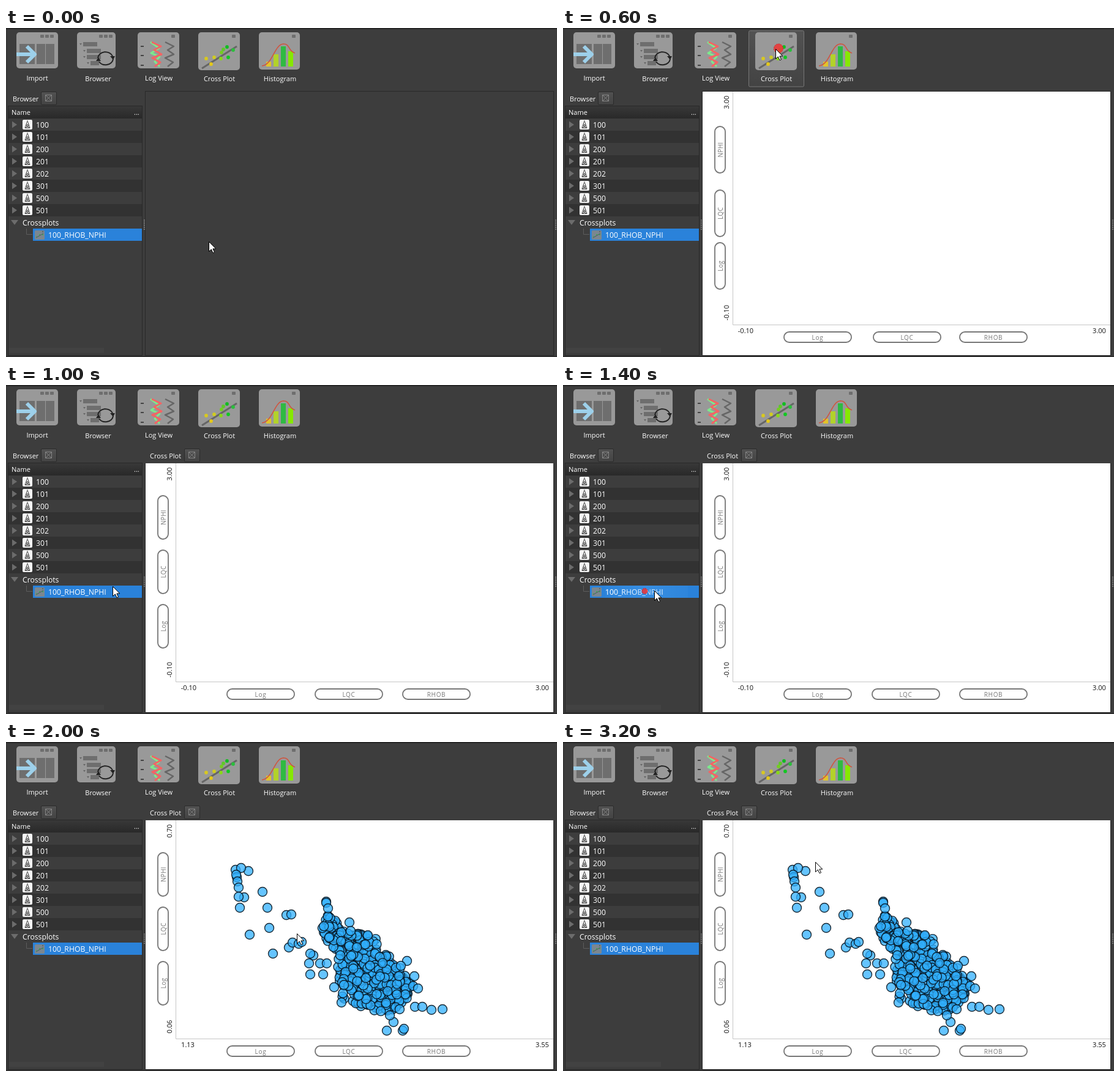
An HTML page for the animation above (3800 ms loop, 900 by 538 pixels).

```html
<!DOCTYPE html>
<html lang="en">
<head>
<meta charset="utf-8">
<title>Cross plot demo</title>
<style>
html, body { margin: 0; width: 100%; height: 100%; overflow: hidden; background: #3d3d3d; }
svg { display: block; width: 900px; height: 538px; }
text { font: 11px "Open Sans", "Noto Sans", sans-serif; fill: #fff; }
.row { font-size: 12.2px; }
.mid { text-anchor: middle; }
.axis { fill: #111; text-anchor: middle; }
.pill { font-size: 10px; fill: #777; text-anchor: middle; }
.line { fill: none; stroke-linejoin: round; }
</style>
</head>
<body>
<svg id="stage" viewBox="0 0 900 538"></svg>
<script>
const LOOP = 3800;

const rect = (x, y, w, h, fill, more = '') =>
  `<rect x="${x}" y="${y}" width="${w}" height="${h}" fill="${fill}" ${more}/>`;
const path = (d, stroke, width = 1, more = '') =>
  `<path class="line" d="${d}" stroke="${stroke}" stroke-width="${width}" ${more}/>`;
const shape = (d, fill) => `<path d="${d}" fill="${fill}"/>`;
const dot = (x, y, r, fill) => `<circle cx="${x}" cy="${y}" r="${r}" fill="${fill}"/>`;
const text = (x, y, s, cls = '', more = '') => `<text x="${x}" y="${y}" class="${cls}" ${more}>${s}</text>`;
const group = (id, body) => `<g id="${id}">${body}</g>`;
const upright = (x, y, s, cls, more = '') =>
  text(0, 0, s, cls, `transform="translate(${x} ${y}) rotate(-90)" ${more}`);

const DEFS = `<defs>
  <linearGradient id="head" x2="0" y2="1"><stop stop-color="#383838"/><stop offset="1" stop-color="#292929"/></linearGradient>
  <linearGradient id="btn" x2="0" y2="1"><stop stop-color="#525252"/><stop offset="1" stop-color="#434343"/></linearGradient>
  <linearGradient id="fade"><stop stop-color="#3c92e4" stop-opacity=".15"/><stop offset=".5" stop-color="#3c92e4" stop-opacity=".75"/><stop offset="1" stop-color="#3c92e4" stop-opacity=".2"/></linearGradient>
</defs>`;

// Toolbar
const tile = (x, y, w, h, squares) =>
  rect(x, y, w, h, '#999', 'rx="5"') +
  squares.map(s => rect(s, y + 4, 6, 5, '#6e6e6e', 'rx="1"')).join('');

function importIcon() {
  return tile(17, 7, 68, 59, [56, 64, 72]) +
    [22, 50, 65].map((x, i) => rect(x, 26, i ? 14 : 25, 33, '#6e6e6e')).join('') +
    path('M17 43H46M34 30L47 43L34 56', '#9dd0ea', 6);
}

function browserIcon() {
  const bars = [[126, 23], [132, 34], [132, 44], [138, 54]];
  return tile(116, 7, 63, 59, [152, 160, 168]) +
    bars.map(([x, y], i) => rect(x, y, i === 3 ? 14 : 23, 7, '#6e6e6e') +
      shape(`M${x - 6} ${y + 2}h4l-2 3z`, '#666')).join('') +
    path('M150 49A12.5 11 0 0 1 174 46M175 51A12.5 11 0 0 1 152 55', '#222', 2) +
    shape('M170 46h8l-3 6zM147 54h8l-4 -6z', '#222');
}

function logIcon() {
  const zig = 'l15 7l-11 6l12 7l-15 6l13 7l-9 7';
  return tile(215, 7, 68, 59, [270]) +
    [29, 44, 60].map(y => rect(220, y, 5, 2, '#444')).join('') +
    path('M236 23l14 10l-13 8l14 6l-8 8l8 8', '#7cea8c', 3) +
    path('M238 23' + zig, '#f46464', 3) +
    path('M260 23l14 7l-10 6l10 7l-14 6l13 7l-9 7', '#666', 2.5);
}

function crossIcon() {
  const dots = [[327, 50, '#d8c820'], [340, 48, '#d0cc20'], [335, 59, '#e4c81a'], [351, 50, '#88d818'],
    [352, 40, '#74cc22'], [355, 35, '#5fc828'], [361, 31, '#12bd22'], [371, 36, '#2abf3c'], [363, 48, '#12c822']];
  return tile(314, 7, 68, 62, [369]) + path('M320 66L377 30', '#666', 3) +
    dots.map(([x, y, c]) => dot(x, y, 2.9, c)).join('');
}

function histIcon() {
  const bars = [[425, 55, '#e2c32a'], [437, 43, '#b2d22a'], [449, 30, '#2fba42'], [461, 38, '#86e800']];
  return tile(413, 7, 67, 61, [467]) +
    bars.map(([x, y, c]) => rect(x, y, 8, 63 - y, c)).join('') +
    path('M418 62C436 60 438 27 453 26C465 26 460 38 472 41', '#d05540', 1.6);
}

const hover = rect(303.5, 4.5, 90, 91.5, 'url(#btn)', 'stroke="#777" rx="2"');
const toolbar = importIcon() + browserIcon() + logIcon() + crossIcon() + histIcon() +
  [[51, 86, 'Import'], [150.5, 87, 'Browser'], [249.5, 86, 'Log View'], [348.5, 87, 'Cross Plot'], [447.5, 87, 'Histogram']]
    .map(([x, y, s]) => text(x, y, s, 'mid')).join('');

// Side panel
const tab = (x, name, bx) => text(x, 120, name) +
  rect(bx + .5, 104.5, 25, 21, 'url(#btn)', 'stroke="#2b2b2b" rx="1.5"') +
  path(`M${bx + 7.5} 109.5h10v10h-10zl10 10m0 -10l-10 10`, '#858585', 1);

function wellRow(name, i) {
  const y = 148 + 20 * i;
  return (i % 2 ? rect(4, y, 218, 20, '#323232') : '') +
    shape(`M10 ${y + 4.5}v11l8 -5.5z`, '#6c6c6c') +
    rect(27, y + 2, 16, 16, '#f6f6f6', 'rx="2"') +
    path(`M34 ${y + 4}h2M34.5 ${y + 5}L31 ${y + 15.5}h8L35.5 ${y + 5}M33 ${y + 9}l4 3l-5 3M37 ${y + 9}l-4 3l5 3`, '#333', .9) +
    text(49, y + 15, name, 'row');
}

const plotRow = rect(44, 328, 178, 20, '#2a82da') +
  rect(47, 331, 16, 15, '#7b8790', 'rx="1.5"') + rect(59, 332, 2, 2, '#5d666d') +
  path('M49 343L61 336', '#4d5a5e', 1) +
  dot(50, 341, 1, '#4ba45c') + dot(55, 338, 1, '#34ad4d') + dot(60, 338, 1, '#2caf50') +
  text(69, 343, '100_RHOB_NPHI', 'row');

const grip = x => [...Array(6)].map((_, i) => rect(x, 313.5 + 3 * i, 2, 1.5, '#888')).join('');

const panel = rect(3.5, 127.5, 219, 408, '#3d3d3d', 'stroke="#292929"') +
  tab(11, 'Browser', 57) +
  rect(4, 128, 218, 20, 'url(#head)') + text(9, 142, 'Name') + text(209, 142, '...') +
  ['100', '101', '200', '201', '202', '301', '500', '501'].map(wellRow).join('') +
  shape('M8 314h12l-6 8z', '#6c6c6c') + text(27, 323, 'Crossplots', 'row') +
  path('M33.5 328V337.5H43', '#5c5c5c') + plotRow +
  rect(5, 523, 155, 8, '#424242') + grip(225) + grip(897);

// Plot area
const pillH = (x, s) => rect(x + 1, 497, 110, 17, '#fff', 'rx="8.5" stroke="#777" stroke-width="1.8"') +
  text(x + 56, 510, s, 'pill', 'letter-spacing=".7"');
const pillV = (y, h, s) => rect(248, y + 1, 17, h - 2, '#fff', 'rx="8.5" stroke="#777" stroke-width="1.8"') +
  upright(260.5, y + h / 2, s, 'pill', 'letter-spacing=".3"');

const sheet = (top, h, ys, midX) => rect(228, top, 666, 535 - top, '#fff') +
  path(`M277.5 ${top}V485.5H894`, '#c6c6c6') +
  ['NPHI', 'LQC', 'Log'].map((s, i) => pillV(ys[i], h, s)).join('') +
  pillH(360, 'Log') + pillH(midX, 'LQC') + pillH(647, 'RHOB');

const scale = (topY, y1, y0, x0, x1, mx = 298.5) => upright(271, topY, y1, 'axis') +
  upright(271, 465.5, y0, 'axis') + text(mx, 499, x0, 'axis') + text(876, 499, x1, 'axis');

// Cloud outline: height, left, right
const BANDS = [[284, 518, 534], [305, 516, 545], [320, 521, 604], [340, 536, 617], [360, 543, 634],
  [380, 539, 653], [400, 546, 666], [420, 549, 654], [442, 604, 634]];
const STRAYS = [375, 209, 396, 211, 384, 206, 377, 221, 376, 217, 378, 228, 380, 238, 389, 254, 380, 253, 382, 271,
  419, 245, 427, 271, 430, 304, 398, 315, 436, 346, 458, 283, 466, 282, 462, 336, 468, 328, 478, 330, 483, 327,
  502, 349, 497, 346, 495, 362, 497, 380, 513, 362, 518, 380, 524, 362, 523, 261, 523, 263, 526, 272, 536, 401,
  561, 295, 563, 309, 655, 358, 645, 366, 667, 383, 665, 399, 673, 403, 668, 433, 680, 433, 695, 438, 713, 437,
  622, 472, 633, 458, 648, 472, 650, 469, 627, 447, 643, 437, 548, 426, 591, 316];

function cloud() {
  let seed = 7, out = '';
  const rnd = () => (seed = seed * 16807 % 2147483647) / 2147483647;
  const mark = (x, y) => { out += `<circle cx="${x.toFixed(1)}" cy="${y.toFixed(1)}" r="7.5"/>`; };
  for (let n = 0; n < 430;) {
    const x = 514 + rnd() * 154, y = 284 + rnd() * 158;
    const i = BANDS.findIndex(b => b[0] > y), [a, b] = [BANDS[i - 1], BANDS[i]];
    if (!a || !b) continue;
    const k = (y - a[0]) / (b[0] - a[0]);
    if (x < a[1] + k * (b[1] - a[1]) || x > a[2] + k * (b[2] - a[2])) continue;
    mark(x, y);
    n++;
  }
  for (let i = 0; i < STRAYS.length; i += 2) mark(STRAYS[i], STRAYS[i + 1]);
  return `<g fill="#32b0ff" fill-opacity=".75" stroke="#06121c" stroke-opacity=".88" stroke-width="1.4">${out}</g>`;
}

const plotTab = tab(235, 'Cross Plot', 291);
const docked = rect(227, 103, 668, 25, '#3d3d3d') + plotTab + sheet(128, 73, [180, 269, 358], 504);

const arrow = '<path d="M.5 .5V16.5L4.3 12.9L7 18.7L9.5 17.6L6.9 12H11.8Z" fill="#fff" stroke="#000" stroke-width="1"/>';
const resize = '<path d="M4.5 .7L8.5 5.5H5.5V17.5H8.5L4.5 22.3L.5 17.5H3.5V5.5H.5Z" fill="#fff" stroke="#000" stroke-width="1"/>';

const stage = document.getElementById('stage');
stage.innerHTML = DEFS + rect(0, 0, 900, 538, '#3d3d3d') + rect(0, 0, 900, 2, '#262626') +
  rect(0, 2, 3, 536, '#393939') + rect(0, 536, 900, 2, '#303030') +
  group('hover', hover) + toolbar + panel +
  rect(227.5, 103.5, 667, 432, '#3d3d3d', 'stroke="#292929"') +
  group('floating', sheet(104, 78, [160, 264, 350], 506) + scale(121.5, '3.00', '-0.10', '-0.10', '3.00')) +
  group('empty', docked + scale(145.5, '3.00', '-0.10', '-0.10', '3.00')) +
  group('filled', docked + scale(145.5, '0.70', '0.06', '1.13', '3.55', 297) + cloud()) +
  group('drag', rect(69, 328, 135, 20, 'url(#fade)') + text(69, 343, '100_RHOB_NPHI', 'row', 'opacity=".6"')) +
  '<circle id="ripple" stroke="#d02020" stroke-width="1" stroke-dasharray="2 1.5"/>' +
  group('arrow', arrow) + group('resize', resize);

// Each step holds until the next one starts
const STEPS = [
  { at: 0, pos: [331, 349] },
  { at: 200, pos: [300, 89], resize: true },
  { at: 400, pos: [351, 33], hover: true },
  { at: 600, pos: [347, 34], hover: true, view: 'floating', ripple: [352, 33.5, 7.5, .85] },
  { at: 800, pos: [173, 300], view: 'empty', ripple: [353, 34.5, 19, .42] },
  { at: 1000, pos: [174, 329], view: 'empty' },
  { at: 1200, pos: [135, 336], view: 'empty' },
  { at: 1400, pos: [149, 336], view: 'empty', drag: true, ripple: [133.5, 337, 4.5, .85] },
  { at: 1600, pos: [304, 318], view: 'empty', drag: true, ripple: [134, 337, 17, .42] },
  { at: 1800, pos: [358, 293], view: 'empty', drag: true },
  { at: 2000, pos: [475, 313], view: 'filled' },
  { at: 2800, pos: [452, 282], view: 'filled' },
  { at: 3000, pos: [413, 198], view: 'filled' },
  { at: 3200, pos: [412, 196], view: 'filled' }
];

const el = id => document.getElementById(id);
const show = (id, on) => { el(id).style.display = on ? '' : 'none'; };
const move = (id, x, y) => el(id).setAttribute('transform', `translate(${x} ${y})`);

function pose(step) {
  const [x, y] = step.pos;
  for (const v of ['floating', 'empty', 'filled']) show(v, step.view === v);
  for (const k of ['hover', 'drag', 'ripple', 'resize']) show(k, step[k]);
  show('arrow', !step.resize);
  move(step.resize ? 'resize' : 'arrow', x, y);
  if (step.drag) move('drag', x - 149, y - 336);
  if (step.ripple) {
    const [cx, cy, r, alpha] = step.ripple;
    const c = el('ripple');
    c.setAttribute('cx', cx);
    c.setAttribute('cy', cy);
    c.setAttribute('r', r);
    c.setAttribute('fill', `rgba(240,50,50,${alpha})`);
  }
}

const start = performance.now();
let current;
function tick() {
  const t = (performance.now() - start) % LOOP;
  const step = STEPS.findLast(s => s.at <= t) || STEPS[0];
  if (step !== current) pose(current = step);
  requestAnimationFrame(tick);
}
tick();
</script>
</body>
</html>
```
